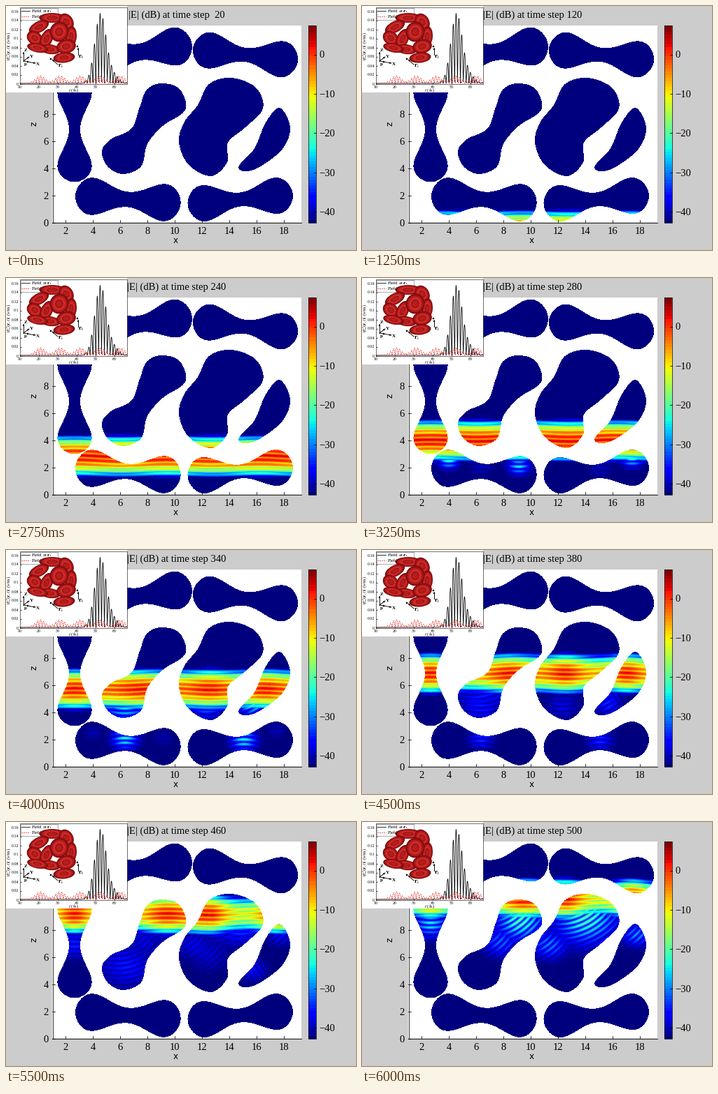
A matplotlib script for the animation above (6.25 s loop, 500 by 350 pixels).

```python
import numpy as np
import matplotlib.pyplot as plt
from matplotlib.animation import FuncAnimation
from matplotlib.patches import Ellipse, Polygon, Rectangle
from matplotlib.path import Path

W, H, DPI = 500, 350, 100
FRAMES, INTERVAL = 25, 250
FLOOR, CEIL = -43.0, 7.4
JET = plt.get_cmap("jet", 64)

plt.rcParams["font.family"] = "Liberation Serif"
plt.rcParams["mathtext.fontset"] = "stix"

fig = plt.figure(figsize=(W / DPI, H / DPI), dpi=DPI, facecolor="#cccccc")
ax = fig.add_axes([0, 0, 1, 1])
ax.set_xlim(0, W)
ax.set_ylim(H, 0)
ax.axis("off")


def px(v):
    return v * 72 / DPI


def text(x, y, s, size=14.6, z=3, **kw):
    kw.setdefault("ha", "center")
    kw.setdefault("va", "baseline")
    return ax.text(x, y, s, fontsize=px(size), zorder=z, **kw)


def line(xs, ys, color="k", w=1, z=3, **kw):
    ax.plot(xs, ys, color=color, lw=px(w), zorder=z, **kw)


def box(x0, y0, x1, y1, face="none", edge="none", w=1, z=1):
    ax.add_patch(Rectangle((x0, y0), x1 - x0, y1 - y0, fc=face, ec=edge,
                           lw=px(w), zorder=z))


# ---- cell outlines -------------------------------------------------------

def biconcave(cx, cy, angle, neck, length=75.5):
    """Red blood cell cross-section."""
    th = np.linspace(0, 2 * np.pi, 160)
    u = np.cos(th)
    v = 0.5 * np.sin(th) * (2 * neck / length + 1.98 * u**2 - 1.13 * u**4)
    a = np.radians(angle)
    return np.column_stack([cx + length * (u * np.cos(a) - v * np.sin(a)),
                            cy + length * (u * np.sin(a) + v * np.cos(a))])


def smooth(*pts, m=12):
    """Closed Catmull-Rom curve."""
    p1 = np.array(pts, float)
    p0, p2, p3 = (np.roll(p1, k, axis=0) for k in (1, -1, -2))
    t = np.linspace(0, 1, m, endpoint=False)[None, :, None]
    p0, p1, p2, p3 = (p[:, None, :] for p in (p0, p1, p2, p3))
    c = 0.5 * (2 * p1 + (p2 - p0) * t + (2 * p0 - 5 * p1 + 4 * p2 - p3) * t**2
               + (3 * p1 - p0 - 3 * p2 + p3) * t**3)
    return c.reshape(-1, 2)


bent = smooth((137, 208), (150, 191), (179, 176), (191, 145), (201, 120),
              (222, 111), (248, 119), (256, 149), (224, 172), (202, 198),
              (193, 230), (167, 241), (145, 230))
bean = smooth((247, 195), (255, 166), (274, 142), (290, 112), (322, 103),
              (357, 117), (367, 147), (342, 174), (317, 196), (316, 224),
              (293, 244), (261, 228))
sliver = smooth((333, 229), (355, 204), (371, 167), (391, 146), (406, 174),
                (395, 205), (362, 231), (340, 237))
cells = [bent, bean, sliver,
         biconcave(191, 66, -9, 12), biconcave(342, 70, 7, 10),
         biconcave(98, 177, 90, 8),
         biconcave(174.3, 277.5, 5, 11), biconcave(334.7, 277.5, -6, 10)]

X0, Y0, X1, Y1 = 66, 28, 422, 310
X, Y = np.meshgrid(np.arange(X0, X1) + 0.5, np.arange(Y0, Y1) + 0.5)
grid = np.column_stack([X.ravel(), Y.ravel()])
inside = np.zeros(len(grid), bool)
for c in cells:
    inside |= Path(c).contains_points(grid)
inside = inside.reshape(X.shape)

# ---- field ---------------------------------------------------------------

# time step: (x, y, size, gain in dB, wave direction in degrees)
ECHOES = {
    278: [(124, 262, 13, 19, 90), (224, 270, 14, 17, 90),
          (386, 259, 14, 19, 90)],
    340: [(170, 271, 17, 18, -90), (340, 273, 17, 18, -90),
          (170, 226, 26, 16, 90), (286, 224, 22, 11, 90),
          (351, 222, 17, 18, 60)],
    420: [(172, 206, 36, 16, 80), (335, 151, 28, 21, 90),
          (290, 190, 28, 9, 50), (352, 212, 19, 14, -40),
          (98, 176, 22, 17, 90)],
    500: [(226, 142, 32, 21, 50), (198, 172, 24, 11, 45),
          (320, 138, 42, 21, 60), (268, 176, 24, 12, 50),
          (393, 162, 19, 13, 45), (98, 146, 22, 17, 90)],
}


def bell(d, w):
    return np.exp(-(d / w) ** 2)


def field(n):
    yc = 278 - 0.56 * (n - 200)
    d = Y - yc
    bend = 1.3 * np.cos((X - 98) / 21)
    ripple = 10 * np.log10(np.cos(np.pi * (d + bend) / 6.6) ** 2 * 0.86 + 0.14)
    # the wave gathers behind each cell as it climbs
    k = np.clip((n - 280) / 140, 0, 1)
    gather = sum(bell(X - x, w) for x, w in
                 ((98, 24), (165 + 65 * k, 36), (290, 27), (360 + 26 * k, 24)))
    fade = 13 * np.clip((n - 300) / 120, 0, 1) * (1 - np.minimum(gather, 1))
    db = 3 - 44 * (d / 32) ** 2 + ripple - fade

    behind = 1 / (1 + np.exp(-(d + 10) / 3))
    for n0, group in ECHOES.items():
        fall = bell(n - n0, 45)
        if fall < 0.03:
            continue
        for x, y, size, gain, deg in group:
            a = np.radians(deg)
            r = np.hypot(X - x + 75 * np.cos(a), Y - y + 75 * np.sin(a))
            fringe = 0.35 + 0.65 * np.cos(np.pi * r / 7 - 0.11 * n) ** 2
            spot = bell(X - x, size) * bell(Y - y, 0.8 * size) * behind
            db = np.maximum(db, FLOOR + 1.15 * gain * fall * fringe * spot)
    img = JET(np.clip((db - FLOOR) / (CEIL - FLOOR), 0, 1))
    img[..., 3] = inside
    return img


# ---- main plot -----------------------------------------------------------

box(X0, Y0, X1, Y1, "white")
wave = ax.imshow(field(20), extent=(X0, X1, Y1, Y0), interpolation="nearest",
                 aspect="auto", zorder=2)
line([X0 + .5, X0 + .5], [Y0, Y1 + .5], w=0.8)
line([X0, X1], [Y1 + .5, Y1 + .5], w=0.8)
for v in range(2, 19, 2):
    x = 46.2 + 19.47 * v
    line([x, x], [Y1 - 3.5, Y1], w=0.8)
    text(x, 327, str(v))
for v in range(0, 13, 2):
    y = 310.5 - 19.4 * v
    line([X0, X0 + 3.5], [y, y], w=0.8)
    text(61, y + 5, str(v), ha="right")
text(242.5, 340, "x", family="DejaVu Sans", size=12)
text(40, 169, "z", family="DejaVu Sans", size=12, va="center", rotation=90)
title = text(244, 17, "")

ax.imshow(np.arange(64)[::-1, None], cmap=JET, extent=(432, 443, 311, 28),
          interpolation="nearest", aspect="auto", zorder=2)
box(432, 28, 443, 311, edge="k", w=0.7, z=3)
for v in range(-40, 1, 10):
    y = 69.5 - 5.64 * v
    line([440, 443], [y, y], w=0.8)
    text(447, y + 5, str(v).replace("-", "\u2212"), ha="left")
ax.set_xlim(0, W)
ax.set_ylim(H, 0)

# ---- inset ---------------------------------------------------------------

Z = 10
RED = "#e02020"
box(0, 0, 173, 124, "white", z=Z)
box(19.5, 1.5, 172.5, 111.5, edge="#333333", w=0.7, z=Z + 1)
for i in range(9):
    y = 111.5 - 13 * i
    line([19.5, 21.5], [y, y], w=0.6, z=Z + 1)
    text(18, y + 2, f"{0.02 * i:.2g}", 6, Z + 1, ha="right")
for i in range(6):
    x = 19.5 + 27 * i
    line([x, x], [109.5, 111.5], w=0.6, z=Z + 1)
    text(x, 118, str(10 * (i + 1)), 6, Z + 1)
text(97, 123, "$t$ (fs)", 7, Z + 1)
text(5, 57, r"$|E_x^s(\mathbf{r},t)|$ (v/m)", 7, Z + 1, va="center", rotation=90)

t = np.linspace(20, 172.5, 1400)
burst = 100 * bell(t - 135, 11.5) + 11 * bell(t - 153, 11)
line(t, 111 - burst * np.abs(np.cos(np.pi * (t - 134.4) / 4.1)), w=0.8, z=Z + 2)
humps = sum(11 * bell(t - 49 - 28.5 * i, 10) for i in range(5))
line(t, 111 - humps * np.abs(np.sin(np.pi * t / 4.3)), RED, 0.8, Z + 3,
     dashes=(2.2, 1.4))

box(20.5, 2.5, 74, 20, "white", "#555555", 0.5, Z + 4)
line([22, 34], [7, 7], w=0.8, z=Z + 5)
line([22, 34], [15, 15], RED, 0.8, Z + 5, dashes=(2.2, 1.4))
text(36, 9, r"Field at $\mathbf{r}_\mathrm{i}$", 7, Z + 5, ha="left")
text(36, 17, r"Field at $\mathbf{r}_\mathrm{t}$", 7, Z + 5, ha="left")


def disc(x, y, w, h, angle, z):
    """Shaded disc with a dimple."""
    shades = ("#7c0d0d", "#a81616", "#c62222", "#d03030", "#a01414", "#b81d1d")
    for s, c in zip(np.linspace(1, 0.3, len(shades)), shades):
        ax.add_patch(Ellipse((x, y), w * s, h * s, angle=angle, fc=c,
                             ec="none", zorder=z))


discs = [
    (66, 17, 37, 14, 0), (86, 23, 20, 26, -30), (47, 30, 31, 16, -28),
    (93, 44, 16, 30, 5), (41, 46, 19, 24, -55), (58, 47, 17, 30, 25),
    (63, 62, 30, 14, 8), (86, 58, 28, 20, -12), (76, 37, 27, 29, 15),
    (83, 74, 31, 15, -6), (45, 60, 30, 13, 12),
]
for i, d in enumerate(discs):
    disc(*d, Z + 6 + 0.1 * i)


def arrow(x0, y0, x1, y1, head=3.2):
    line([x0, x1], [y0, y1], w=0.9, z=Z + 8)
    a = np.arctan2(y1 - y0, x1 - x0)
    back = [(x1 - head * np.cos(a + s), y1 - head * np.sin(a + s))
            for s in (-.45, .45)]
    ax.add_patch(Polygon([(x1, y1), *back], fc="k", ec="none", zorder=Z + 8))


for tip in ((25, 66), (33, 73), (42, 82)):
    arrow(25, 79, *tip)
arrow(74, 84, 66, 77)
arrow(103, 70, 103, 60)
for dot in ((31, 80), (64, 76), (102, 58)):
    ax.add_patch(Ellipse(dot, 2.6, 2.6, fc="k", zorder=Z + 8))
for x, y, s in ((28, 65, "Z"), (36, 74, "Y"), (45, 85, "X"), (28, 85, "p")):
    text(x, y, s, 7, Z + 8, weight="bold")
text(78, 88, r"$\mathbf{r}_\mathrm{i}$", 9, Z + 8)
text(107, 75, r"$\mathbf{r}_\mathrm{t}$", 9, Z + 8)


def update(i):
    step = 20 * (i + 1)
    title.set_text(f"|E| (dB) at time step {step:3d}")
    wave.set_data(field(step))
    return title, wave


anim = FuncAnimation(fig, update, frames=FRAMES, interval=INTERVAL,
                     repeat=True, repeat_delay=0, blit=False)
plt.show()
```
